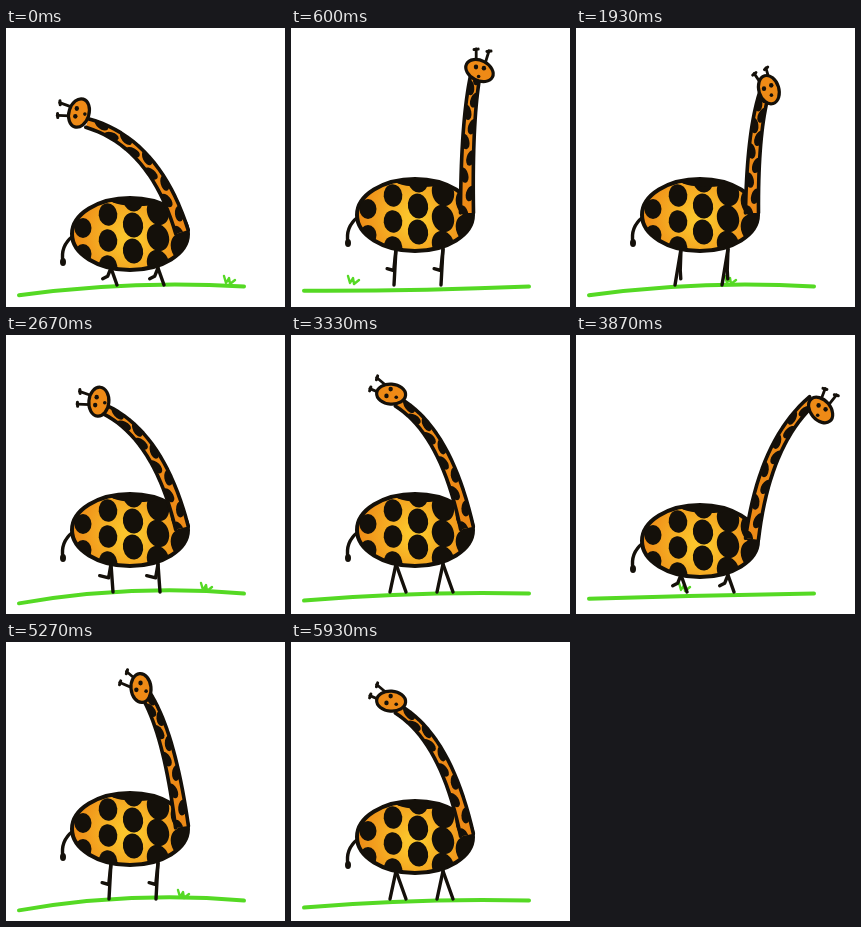
These frames come from a looping animation (279 by 279 pixels, 5.99 s). An HTML page with a canvas:

```html
<!DOCTYPE html>
<html lang="en">
<head>
<meta charset="utf-8">
<title>Walking giraffe</title>
<style>
html, body { margin: 0; width: 100%; height: 100%; overflow: hidden; background: #fff; }
canvas { display: block; width: 279px; height: 279px; }
</style>
</head>
<body>
<canvas id="stage"></canvas>
<script>
const SIZE = 279, LOOP = 5990, TICKS = 90, BEATS = 10;
const INK = '#14100a', ORANGE = '#ee8a16', YELLOW = '#fbc52c', GREEN = '#55d924';
const BODY_X = 124, BODY_RX = 58, BODY_RY = 36;
const HIPS = [105, 152], FLOOR = 257;
// the head's closed path, one point for every second beat
const HEAD_PATH = [[73, 85], [135, 46], [241, 80], [225, 62], [145, 32]];

const canvas = document.getElementById('stage');
const ctx = canvas.getContext('2d');
const scale = window.devicePixelRatio || 1;
canvas.width = canvas.height = Math.round(SIZE * scale);

const mix = (a, b, k) => a + (b - a) * k;
const turn = beat => beat / BEATS * Math.PI * 2;

function stroke(width, color = INK) {
  ctx.lineWidth = width;
  ctx.strokeStyle = color;
  ctx.stroke();
}

function line(points, width, color) {
  ctx.beginPath();
  points.forEach(([x, y]) => ctx.lineTo(x, y));
  stroke(width, color);
}

function curve(x0, y0, cx, cy, x1, y1, width, color) {
  ctx.beginPath();
  ctx.moveTo(x0, y0);
  ctx.quadraticCurveTo(cx, cy, x1, y1);
  stroke(width, color);
}

function blob(x, y, rx, ry, tilt = 0, fill = INK) {
  ctx.beginPath();
  ctx.ellipse(x, y, rx, ry, tilt, 0, Math.PI * 2);
  ctx.fillStyle = fill;
  ctx.fill();
}

// the body bobs twice per cycle
function bodyHeight(beat) {
  const a = 2 * turn(beat);
  return 194 + 9.6 * Math.cos(a) + 2.4 * Math.cos(2 * a);
}

// points of the path on even beats, a smooth midpoint on odd ones
function headPoint(beat) {
  const n = HEAD_PATH.length, i = Math.floor(beat / 2);
  const key = (j, axis) => HEAD_PATH[(i + j + n) % n][axis];
  return [0, 1].map(axis => beat % 2
    ? (9 * (key(0, axis) + key(1, axis)) - key(-1, axis) - key(2, axis)) / 16
    : key(0, axis));
}

function drawGround(beat) {
  const sway = Math.cos(turn(beat - 1.5));
  const left = 265.5 + 3 * sway, middle = 259 - 3 * sway, right = 258.5;
  curve(13, left, 125, 2 * middle - (left + right) / 2, 238, right, 4, GREEN);
  const x = 222 - 23 * beat;
  if (x < 30) return;
  line([[x - 4, 248], [x - 2, 255], [x + 1, 250], [x + 2, 256], [x + 7, 252]], 2.4, GREEN);
}

// a foot slides back on the floor for five beats, then swings forward for five
function drawLeg(hip, top, beat) {
  const swing = Math.max(0, beat - 5) / 5;
  const bend = Math.sin(Math.PI * swing) ** 2;
  const reach = beat < 5 ? 10 - 4 * beat : mix(-6, 10, swing ** 3) - 7 * bend;
  const footX = hip + reach, footY = FLOOR - 18 * bend;
  const kneeX = mix(hip + reach / 2, hip - 2, bend);
  const kneeY = mix((top + footY) / 2, footY + 3, bend);
  line([[hip, top], [kneeX, kneeY], [footX, footY]], 3.4);
}

function drawLegs(beat, y) {
  for (const hip of HIPS) {
    for (const shift of [1, 6]) {
      drawLeg(hip, y + BODY_RY - 2, (beat + shift) % BEATS);
    }
  }
}

function drawTail(y) {
  curve(67, y + 2, 54, y + 12, 57, y + 28, 3.4);
  blob(57, y + 28, 3, 4);
}

function drawSpots(y) {
  for (let col = 0; col < 5; col++) {
    for (let row = 0; row < 3; row++) {
      const dy = -32 + 26 * row + (col % 2 ? 14 : 0) - 1.5 * col;
      blob(BODY_X - 47 + 25 * col, y + dy, 8.5 + 0.8 * col, 10 + 1.3 * col, -0.1 * col);
    }
  }
  blob(BODY_X + 8, y - BODY_RY, 30, 8);
}

function drawBody(y) {
  ctx.beginPath();
  ctx.ellipse(BODY_X, y, BODY_RX, BODY_RY, 0, 0, Math.PI * 2);
  const paint = ctx.createRadialGradient(BODY_X, y + 5, 8, BODY_X, y, BODY_RX);
  paint.addColorStop(0, YELLOW);
  paint.addColorStop(1, ORANGE);
  ctx.fillStyle = paint;
  ctx.fill();
  stroke(4);
  ctx.save();
  ctx.clip();
  drawSpots(y);
  ctx.restore();
}

function neckPoint(t, from, bend, to) {
  const u = 1 - t;
  const at = i => u * u * from[i] + 2 * u * t * bend[i] + t * t * to[i];
  const slope = i => u * (bend[i] - from[i]) + t * (to[i] - bend[i]);
  return { x: at(0), y: at(1), angle: Math.atan2(slope(1), slope(0)) };
}

function drawNeck(beat, y, [hx, hy]) {
  const lean = Math.cos(turn(beat));
  const from = [176, y - 2];
  const bend = [132 + 0.23 * hx, 55 + 0.7 * hy];
  const to = [hx + 8 * lean, hy + 10 * lean];
  const beside = (t, offset) => {
    const q = neckPoint(t, from, bend, to);
    return [q.x - Math.sin(q.angle) * offset, q.y + Math.cos(q.angle) * offset, q.angle];
  };
  const edge = side => Array.from({ length: 21 }, (_, i) => beside(i / 20, side * mix(6.5, 4.5, i / 20)));
  const left = edge(-1), right = edge(1);

  ctx.save();
  ctx.beginPath();
  [...left, ...right.slice().reverse()].forEach(([px, py]) => ctx.lineTo(px, py));
  ctx.fillStyle = ORANGE;
  ctx.fill();
  ctx.clip();
  for (let i = 0; i < 10; i++) {
    const side = i % 2 ? 3.4 : -3.4;
    const [px, py, angle] = beside(i * 0.1, side);
    blob(px, py, 8, 4.4, angle + side * 0.08);
  }
  ctx.restore();
  line(left, 3.6);
  line(right, 3.6);
}

function drawHead(beat, [x, y]) {
  const angle = (245 - 57 * Math.cos(turn(beat - 0.5))) * Math.PI / 180;
  const ux = Math.cos(angle), uy = Math.sin(angle);
  const at = (along, across) => [x + ux * along - uy * across, y + uy * along + ux * across];
  for (const side of [-1, 1]) {
    line([at(8, 4.5 * side), at(21, 6.5 * side)], 2.8);
    line([at(20, 6.5 * side - 2), at(21, 6.5 * side + 2)], 3);
  }
  blob(x, y, 10, 14.5, 0.3 - 0.2 * beat, ORANGE);
  stroke(3.2);
  blob(...at(3, -4), 2.2, 2.4);
  blob(...at(3, 4), 2.2, 2.4);
  blob(...at(-6, 0), 1.8, 1.8);
}

function draw(beat) {
  const y = bodyHeight(beat), head = headPoint(beat);
  ctx.setTransform(scale, 0, 0, scale, 0, 0);
  ctx.fillStyle = '#fff';
  ctx.fillRect(0, 0, SIZE, SIZE);
  ctx.lineCap = ctx.lineJoin = 'round';
  drawGround(beat);
  drawLegs(beat, y);
  drawTail(y);
  drawBody(y);
  drawNeck(beat, y, head);
  drawHead(beat, head);
}

const start = performance.now();
function frame() {
  const t = Math.max(0, performance.now() - start) % LOOP;
  const tick = Math.floor(t / LOOP * TICKS);
  // beats come a little slower than ticks
  draw(Math.floor(tick * 0.775 + 0.9) % BEATS);
  requestAnimationFrame(frame);
}
frame();
</script>
</body>
</html>
```
